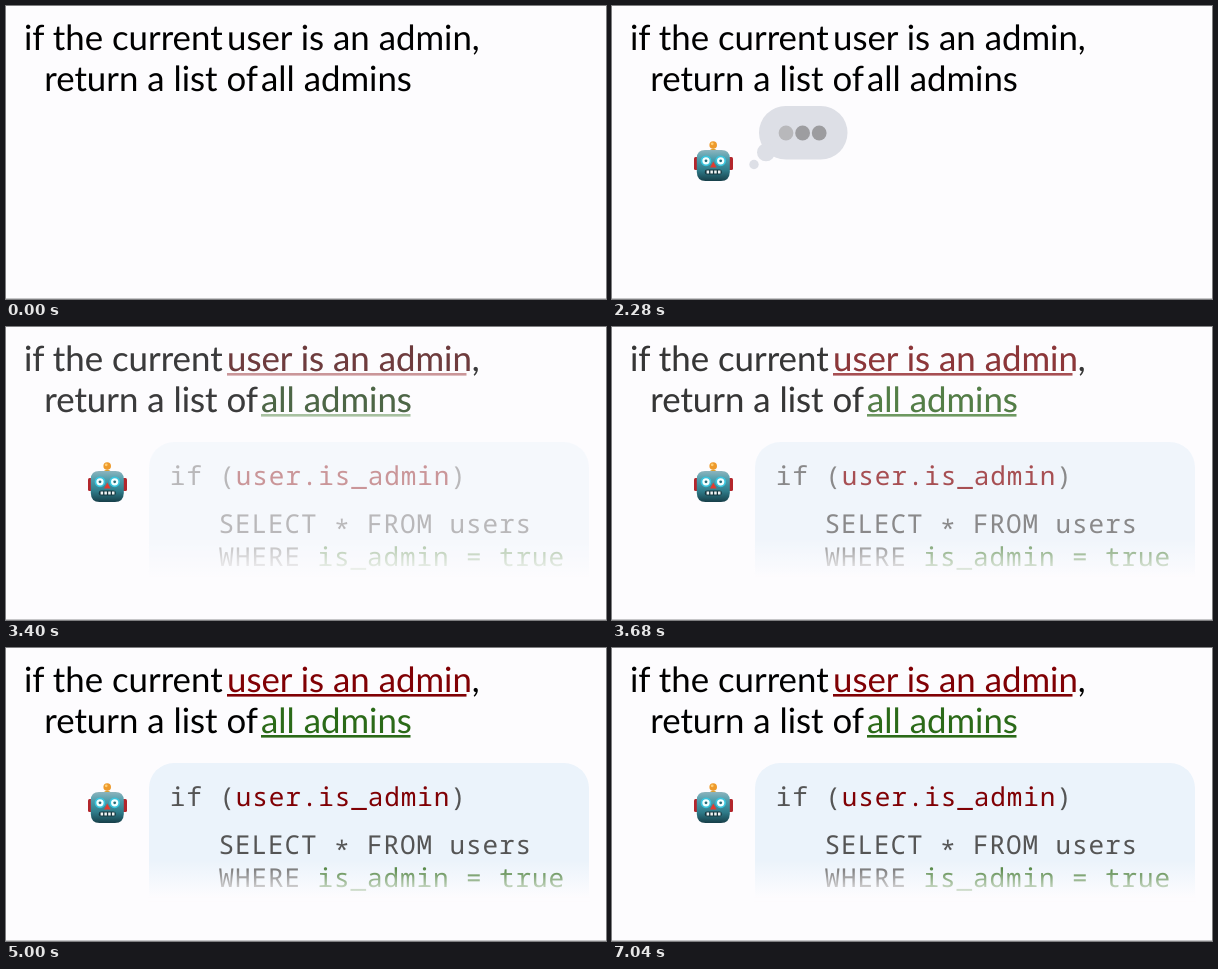
Animation of 600x293 px, one loop 7.08 s. Source, as an HTML page:

```html
<!DOCTYPE html>
<html lang="en">
<head>
<meta charset="utf-8">
<title>From prompt to query</title>
<style>
  html, body { margin: 0; width: 100%; height: 100%; overflow: hidden; background: #fdfcfe; }
  svg { display: block; width: 100%; height: 100%; }
  text { text-rendering: geometricPrecision; }
  .title { font: 34.8px Lato, sans-serif; }
  .code { font: 26px "Noto Sans Mono", monospace; letter-spacing: .9px; fill: #555; }
  .red { fill: #800004; }
  .green { fill: #2b6a18; }
</style>
</head>
<body>
<svg viewBox="0 0 600 293">
  <defs>
    <linearGradient id="head" x2="0" y2="1">
      <stop offset="0" stop-color="#8db4bd"/>
      <stop offset=".3" stop-color="#4a9cab"/>
      <stop offset=".65" stop-color="#2f7c8a"/>
      <stop offset="1" stop-color="#173f49"/>
    </linearGradient>
    <linearGradient id="fade" x2="0" y2="1">
      <stop offset="0" stop-color="#fdfcfe" stop-opacity="0"/>
      <stop offset="1" stop-color="#fdfcfe"/>
    </linearGradient>
  </defs>
  <rect width="600" height="293" fill="#fdfcfe"/>
  <rect y="292" width="600" height="1" fill="#c6c6c8"/>

  <g id="plain" class="title">
    <text x="18" y="43.5">if the current</text>
    <text x="221" y="43.5">user is an admin,</text>
    <text x="38.2" y="84.5">return a list of</text>
    <text x="255" y="84.5">all admins</text>
  </g>

  <g id="answer" opacity="0">
    <g class="title">
      <text x="18" y="43.5">if the current</text>
      <text x="221" y="43.5"><tspan class="red">user is an admin</tspan>,</text>
      <text x="38.2" y="84.5">return a list of</text>
      <text x="255" y="84.5" class="green">all admins</text>
      <rect class="red" x="221" y="46" width="239.5" height="2.6"/>
      <rect class="green" x="255" y="87" width="149.5" height="2.6"/>
    </g>
    <path d="M143 252V140a25 25 0 0 1 25-25H558a25 25 0 0 1 25 25V252Z" fill="#ebf3fb"/>
    <g class="code">
      <text x="163.7" y="158">if (<tspan class="red">user.is_admin</tspan>)</text>
      <text x="212.5" y="206">SELECT <tspan dy="4.5">*</tspan><tspan dy="-4.5"> FROM users</tspan></text>
      <text x="212.5" y="239">WHERE <tspan class="green">is_admin = true</tspan></text>
    </g>
    <rect x="142" y="212" width="442" height="38" fill="url(#fade)"/>
    <rect x="142" y="249.5" width="442" height="4" fill="#fdfcfe"/>
  </g>

  <g id="robot" opacity="0">
    <rect x="82" y="151" width="5" height="13" rx="1.5" fill="#b3262c"/>
    <rect x="116" y="151" width="5" height="13" rx="1.5" fill="#b3262c"/>
    <path d="M96 146q5.2-7 10.4 0Z" fill="#d9a032"/>
    <circle cx="101.2" cy="139" r="3.8" fill="#ee9a2b"/>
    <circle cx="100.2" cy="137.8" r="1.4" fill="#ffce73"/>
    <path d="M93 144H109.5Q117.5 144 117.8 152V166Q117.5 175 109 175H93.5Q85 175 84.8 166V152Q85 144 93 144Z" fill="url(#head)"/>
    <g fill="#f4ffff" stroke="#39c3dc" stroke-width="1.7">
      <circle cx="94" cy="154.8" r="4.5"/>
      <circle cx="108.7" cy="154.8" r="4.5"/>
    </g>
    <circle cx="94" cy="154.8" r="1.4" fill="#256a78"/>
    <circle cx="108.7" cy="154.8" r="1.4" fill="#256a78"/>
    <path d="M101.3 155.5L104.6 161.6H98Z" fill="#e23b30"/>
    <rect x="92.8" y="163.4" width="17" height="5.2" rx="2.4" fill="#173840"/>
    <path d="M94.6 166H108.6" stroke="#f1f5f5" stroke-width="2.8" stroke-dasharray="2.5 1.3"/>
  </g>

  <g id="bubble" opacity="0">
    <g fill="#dddfe6">
      <rect x="147" y="100" width="88.5" height="53.5" rx="26.7"/>
      <circle cx="154" cy="146.3" r="9"/>
      <circle cx="142" cy="158.5" r="4.7"/>
    </g>
    <g id="dots">
      <circle cx="174" cy="127" r="7.4"/>
      <circle cx="190.6" cy="127" r="7.4"/>
      <circle cx="207.2" cy="127" r="7.4"/>
    </g>
  </g>
</svg>
<script>
  const LOOP = 7080;
  const DOT_PERIOD = 1000;
  const byId = id => document.getElementById(id);
  const [plain, answer, robot, bubble] = ['plain', 'answer', 'robot', 'bubble'].map(byId);
  const dots = [...byId('dots').children];

  const ramp = (t, from, to) => Math.min(1, Math.max(0, (t - from) / (to - from)));
  const setOpacity = (node, value) => node.setAttribute('opacity', value);

  function draw(t) {
    const appear = ramp(t, 80, 700);
    const dissolve = ramp(t, 3000, 4000);
    setOpacity(robot, appear);
    setOpacity(bubble, appear * (1 - ramp(t, 2340, 2960)));
    setOpacity(plain, 1 - dissolve);
    setOpacity(answer, dissolve);
    // A darker shade travels through the dots from left to right.
    dots.forEach((dot, i) => {
      const phase = (t - 1400) / DOT_PERIOD - (i - 2) / 4;
      const shade = Math.round(170 - 19 * Math.cos(2 * Math.PI * phase));
      dot.setAttribute('fill', `rgb(${shade},${shade},${shade + 3})`);
    });
  }

  const start = performance.now();
  function tick() {
    draw((performance.now() - start) % LOOP);
    requestAnimationFrame(tick);
  }
  tick();
</script>
</body>
</html>
```
